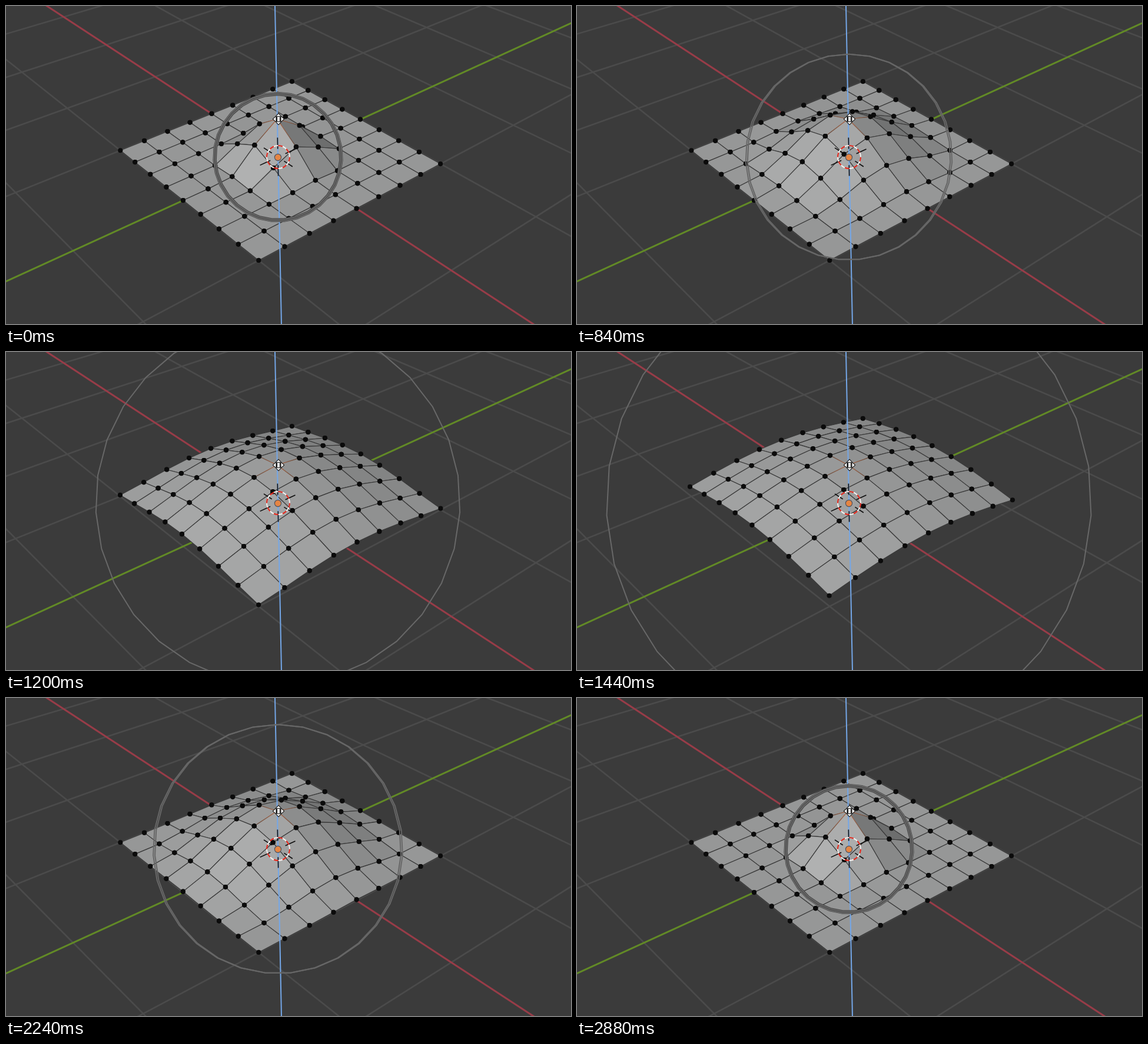
Recreate the animation shown at these times as an HTML page with a canvas. Size 960 px wide and 540 px high, loop 3.28 s.

```html
<!DOCTYPE html>
<html lang="en">
<head>
<meta charset="utf-8">
<title>Proportional editing</title>
<style>
  html, body { margin: 0; width: 100%; height: 100%; overflow: hidden; background: #3b3b3b; }
  canvas { display: block; }
</style>
</head>
<body>
<canvas id="stage" width="960" height="540"></canvas>
<script>
const ctx = document.getElementById('stage').getContext('2d');
const LOOP = 3280;
const CELLS = 8;
const HEIGHT = 0.3865;
const UNIT = 193.2;          // pixels per world unit at the origin
const BASE_RADIUS = 108.5;
const CENTER = [462, 256.5];
const EDGE = '#383838';

// Times of the scroll notches; each scales the radius by 1.1.
const GROW = [400, 480, 600, 720, 840, 880, 920, 1000, 1080, 1120, 1200, 1280, 1360, 1440];
const SHRINK = [1560, 1680, 1840, 1960, 2000, 2080, 2200, 2320, 2400, 2520, 2600, 2680, 2760, 2840];

function notchAt(t) {
  const passed = list => list.filter(time => time <= t).length;
  return passed(GROW) - passed(SHRINK);
}

function project(x, y, z = 0) {
  const w = 1 - 0.0854 * x + 0.0698 * y - 0.0729 * z;
  return [
    (462 + 82.66 * x + 182 * y - 37 * z) / w,
    (256.5 + 57.9 * x - 50.5 * y - 180.9 * z) / w,
    w
  ];
}

function path(points, closed) {
  ctx.beginPath();
  points.forEach(p => ctx.lineTo(p[0], p[1]));
  if (closed) ctx.closePath();
}

function stroke(points, color, width, closed = false) {
  path(points, closed);
  ctx.strokeStyle = color;
  ctx.lineWidth = width;
  ctx.stroke();
}

function fill(points, color) {
  path(points, true);
  ctx.fillStyle = color;
  ctx.fill();
}

function dot(p, r, color) {
  ctx.beginPath();
  ctx.arc(p[0], p[1], r, 0, Math.PI * 2);
  ctx.fillStyle = color;
  ctx.fill();
}

function drawFloor() {
  ctx.fillStyle = '#3b3b3b';
  ctx.fillRect(0, 0, 960, 540);
  const alongX = (y, color, width) => stroke([project(-6, y), project(6, y)], color, width);
  const alongY = (x, color, width) => stroke([project(x, -6), project(x, 6)], color, width);
  for (let i = -6; i <= 6; i++) {
    if (!i) continue;
    alongX(i, '#4b4b4b', 2.6);
    alongY(i, '#4b4b4b', 2.6);
  }
  alongX(0, '#983c48', 3);
  alongY(0, '#628a26', 3);
}

function buildVertices(radius) {
  const rows = [];
  for (let i = 0; i <= CELLS; i++) {
    rows.push([]);
    for (let j = 0; j <= CELLS; j++) {
      const x = i * 2 / CELLS - 1, y = j * 2 / CELLS - 1;
      const k = Math.max(0, 1 - Math.hypot(x, y) / radius);
      const z = HEIGHT * k * k * (3 - 2 * k);
      rows[i].push({ z, screen: project(x, y, z), selected: !x && !y });
    }
  }
  return rows;
}

function shade([a, b, c, d]) {
  const step = 4 / CELLS;
  const nx = -(b.z + c.z - a.z - d.z) / step;
  const ny = -(c.z + d.z - a.z - b.z) / step;
  const light = 89 + (18 * nx - 62 * ny + 62) / Math.hypot(nx, ny, 1);
  return `rgb(${light - 1},${light},${light})`;
}

function drawEdge(a, b) {
  let color = EDGE;
  if (a.selected || b.selected) {
    const [from, to] = a.selected ? [a.screen, b.screen] : [b.screen, a.screen];
    color = ctx.createLinearGradient(from[0], from[1], to[0], to[1]);
    color.addColorStop(0, '#b56845');
    color.addColorStop(1, '#5b4a40');
  }
  stroke([a.screen, b.screen], color, 1.15);
}

function drawMesh(radius) {
  const v = buildVertices(radius);
  const faces = [];
  for (let i = 0; i < CELLS; i++) {
    for (let j = 0; j < CELLS; j++) {
      const corners = [v[i][j], v[i + 1][j], v[i + 1][j + 1], v[i][j + 1]];
      faces.push({ corners, depth: corners.reduce((sum, p) => sum + p.screen[2], 0) });
    }
  }
  faces.sort((a, b) => b.depth - a.depth);
  for (const { corners } of faces) {
    fill(corners.map(p => p.screen), shade(corners));
    corners.forEach((p, n) => drawEdge(p, corners[(n + 1) % 4]));
    corners.forEach(p => dot(p.screen, 4.1, '#0b0b0b'));
  }
}

function drawInfluence(radius, notch) {
  const ring = (rx, ry) => Array.from({ length: 31 }, (_, n) => {
    const a = n * Math.PI * 2 / 31 - Math.PI / 2;
    return [CENTER[0] + rx * Math.cos(a), CENTER[1] + ry * Math.sin(a)];
  });
  const inset = notch < 9 ? 3 : 0;
  const insetY = notch < 3 ? 3 : 0;
  if (notch < 3) stroke(ring(radius - 1, radius - 1), '#484848', 6.5, true);
  stroke(ring(radius + inset / 4, radius + insetY / 4), '#686868', 2, true);
  if (inset) stroke(ring(radius - inset * 0.75, radius - insetY * 0.75), '#666666', 2, true);
}

function drawOrigin() {
  for (const axis of [[1, 0, 0], [0, 1, 0], [0, 0, 1]]) {
    for (const side of [-1, 1]) {
      const at = d => project(...axis.map(c => c * d * side));
      stroke([at(0.085), at(0.2)], '#0c0c0c', 1.6);
    }
  }
  const parts = 16;
  for (let n = 0; n < parts; n++) {
    ctx.beginPath();
    ctx.arc(462.5, 256.5, 19.5, n * Math.PI * 2 / parts, (n + 1) * Math.PI * 2 / parts);
    ctx.strokeStyle = n % 2 ? '#f3f0ee' : '#e8271c';
    ctx.lineWidth = 2;
    ctx.stroke();
  }
  dot([462, 257], 6.2, '#4d5362');
  dot([462, 257], 5, '#e58543');
}

function drawPointer() {
  ctx.save();
  ctx.translate(463, 192);
  ctx.lineJoin = 'round';
  for (let n = 0; n < 4; n++) {
    const arrow = [[0, -9], [4, -4.5], [-4, -4.5]];
    stroke(arrow, '#151515', 2.2, true);
    fill(arrow, '#f2f2f2');
    ctx.rotate(Math.PI / 2);
  }
  const core = [[-2, -4], [2, -4], [2, 4], [-2, 4]];
  stroke(core, '#151515', 2, true);
  fill(core, '#f2f2f2');
  ctx.restore();
}

function draw(t) {
  const notch = notchAt(t);
  const radius = BASE_RADIUS * 1.1 ** notch;
  drawFloor();
  drawMesh(radius / UNIT);
  stroke([[457, 0], [468, 540]], '#74a7e8', 2);
  drawInfluence(radius, notch);
  drawOrigin();
  drawPointer();
}

const start = performance.now();
function tick() {
  draw((performance.now() - start) % LOOP);
  requestAnimationFrame(tick);
}
tick();
</script>
</body>
</html>
```
